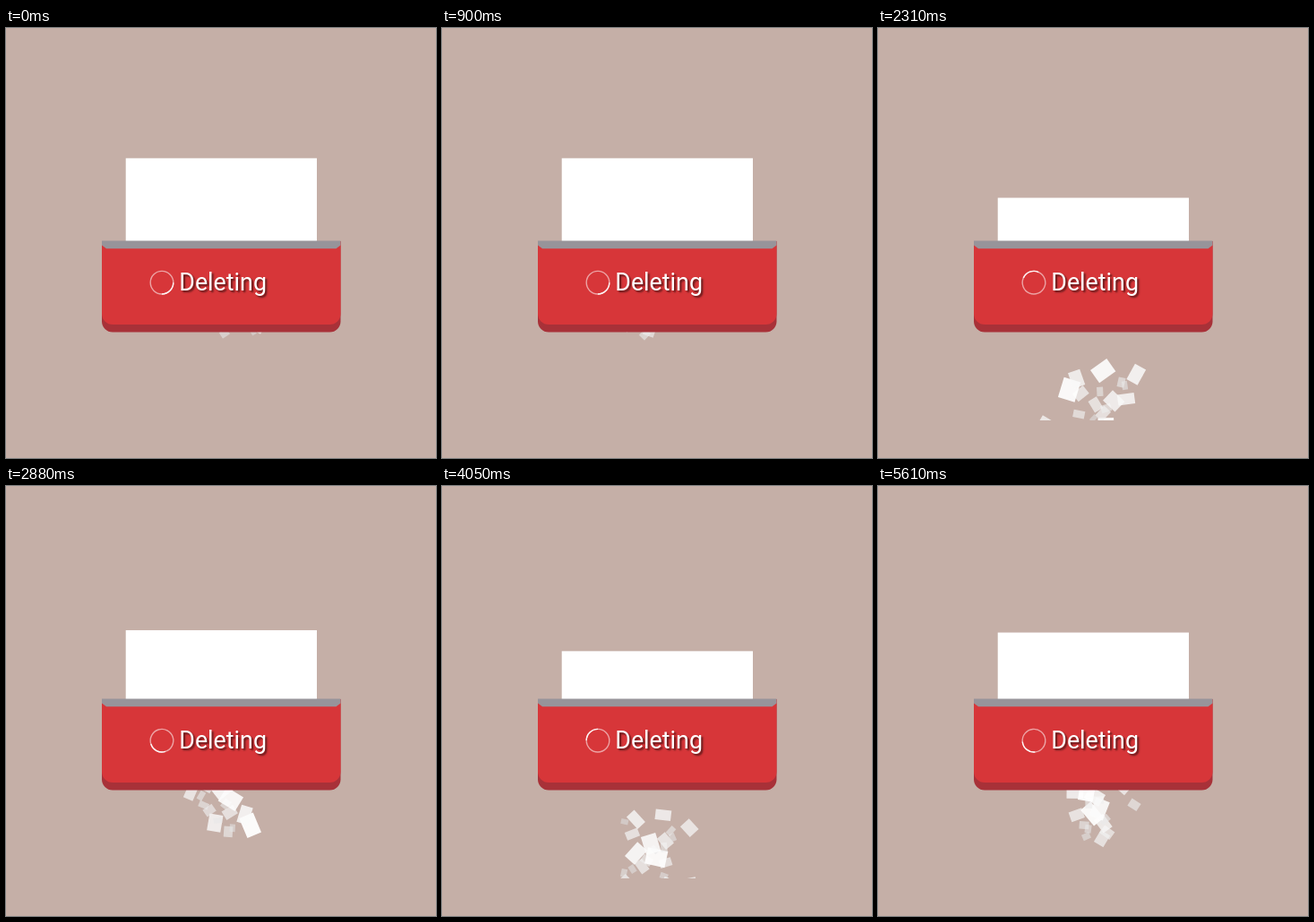
Animation, 480 px wide and 480 px high, one loop 5640 ms. Source, as an HTML page with a canvas:

```html
<!DOCTYPE html>
<html lang="en">
<head>
<meta charset="utf-8">
<title>Deleting</title>
<style>
  html, body { margin: 0; width: 100%; height: 100%; overflow: hidden; background: #c5afa7; }
  canvas, svg { position: absolute; left: 0; top: 0; }
  .label {
    font: 26.8px Roboto, Arial, sans-serif;
    fill: #fff;
    text-shadow: 2px 2px 2px rgba(0, 0, 0, .55);
  }
</style>
</head>
<body>
<canvas id="scraps" width="480" height="438"></canvas>
<svg width="480" height="480" viewBox="0 0 480 480">
  <rect id="paper" x="133.7" y="145.3" width="213.3" height="93" fill="#fff"/>
  <path d="M107 238H373.5V327.5a12 12 0 0 1-12 12H119a12 12 0 0 1-12-12Z" fill="#a83138"/>
  <path d="M107 238H373.5V319a12 12 0 0 1-12 12H119a12 12 0 0 1-12-12Z" fill="#d73639"/>
  <path d="M107 237.5H373.5V242.5L368.5 246.2H112L107 242.5Z" fill="#97949a"/>
  <g id="spinner" fill="none" stroke="#fff" stroke-width="1.4">
    <circle cx="174" cy="284.2" r="12.8" opacity=".55"/>
    <path d="M186.8 284.2A12.8 12.8 0 0 1 174 297" opacity=".9"/>
  </g>
  <text class="label" x="193.3" y="293">Deleting</text>
</svg>
<script>
const LOOP = 5640, CYCLE = 900;
const FALL = 0.25, SLOT = 339;      // scrap speed in px/ms, bottom edge of the shredder
const COUNT = 24, SPREAD = 360;     // scraps per sheet, time over which they come out
const PAPER_TOP = 145.3, FEED = 0.0866;

const paper = document.getElementById('paper');
const spinner = document.getElementById('spinner');
const ctx = document.getElementById('scraps').getContext('2d');

function seeded(seed) {
  return (lo, hi) => {
    seed = (seed * 16807) % 2147483647;
    return lo + (hi - lo) * seed / 2147483647;
  };
}

function makeScraps(cycle) {
  const rnd = seeded(7919 * (cycle + 3));
  return Array.from({ length: COUNT }, (_, i) => {
    const size = rnd(0, 1) ** 1.4;  // mostly small, a few large
    return {
      start: (i + rnd(0, 1)) / COUNT * SPREAD - 20,
      x: 240 + rnd(-28, 28) + rnd(-28, 28),
      w: 8 + 16 * size,
      ratio: rnd(.6, .85),
      angle: rnd(0, Math.PI),
      spin: rnd(-.004, .004),
      drift: rnd(-.02, .02),
      shade: 86 + 14 * Math.sqrt(size),
      alpha: .55 + .4 * size
    };
  });
}

const cycles = Array.from({ length: Math.ceil(LOOP / CYCLE) }, (_, i) => makeScraps(i));

function drawScrap(s, phase) {
  const age = phase - s.start;
  const y = SLOT + FALL * age;
  if (y < SLOT - 30) return;        // still hidden inside the shredder
  ctx.save();
  ctx.translate(s.x + s.drift * age, y);
  ctx.rotate(s.angle + s.spin * age);
  ctx.globalAlpha = s.alpha;
  ctx.fillStyle = `hsl(0 0% ${s.shade}%)`;
  ctx.fillRect(-s.w / 2, -s.w * s.ratio / 2, s.w, s.w * s.ratio);
  ctx.restore();
}

function draw(now) {
  const t = now % LOOP;
  const phase = t % CYCLE;
  paper.setAttribute('y', PAPER_TOP + FEED * phase);
  spinner.setAttribute('transform', `rotate(${phase / CYCLE * 360} 174 284.2)`);
  ctx.clearRect(0, 0, 480, 438);
  for (const s of cycles[Math.floor(t / CYCLE)]) drawScrap(s, phase);
}

const begin = performance.now();
function tick() {
  draw(performance.now() - begin);
  requestAnimationFrame(tick);
}
tick();
</script>
</body>
</html>
```
